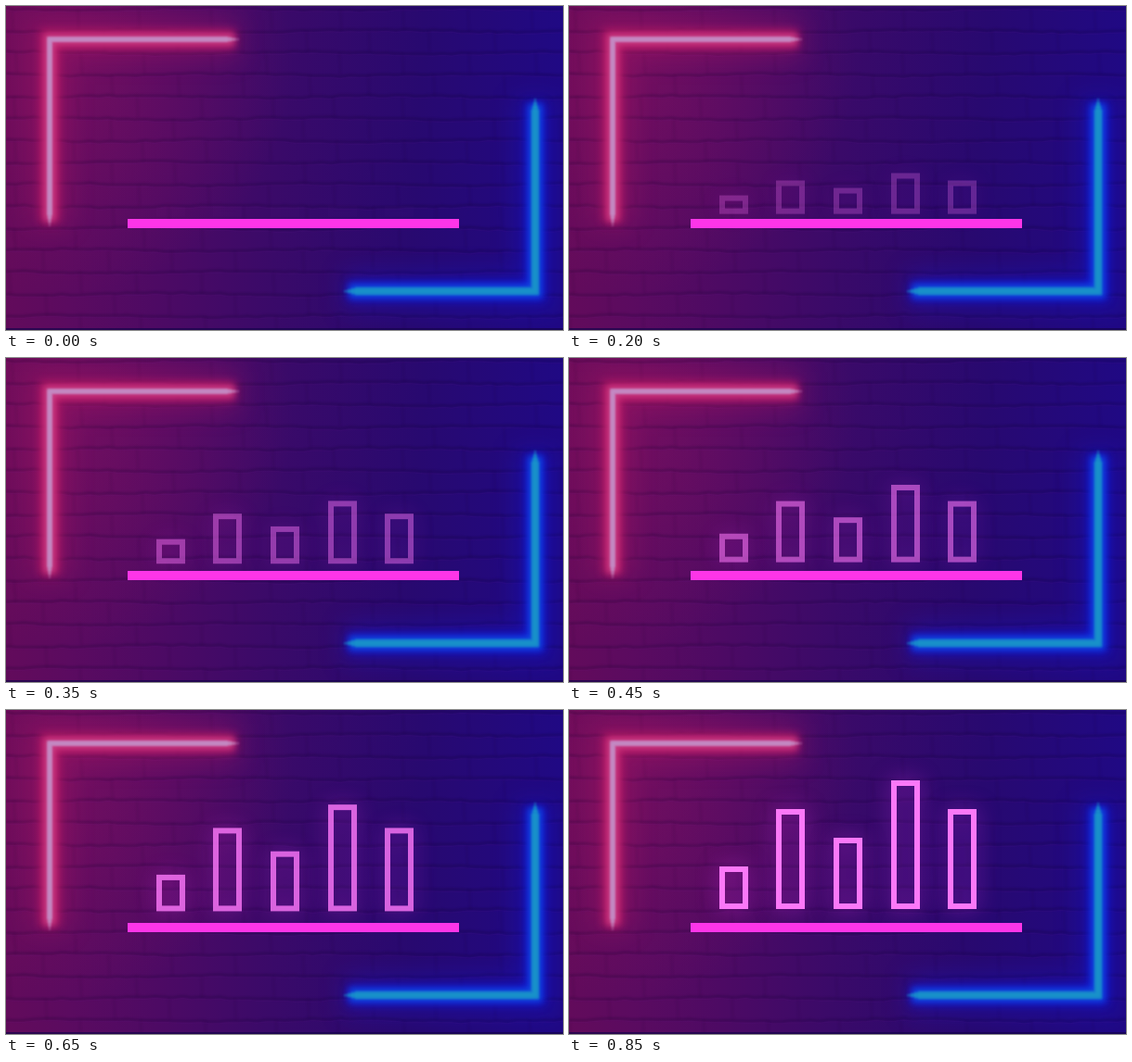
Animation of 600x350 px, one loop 900 ms. Source, as an HTML page with a canvas:

```html
<!DOCTYPE html>
<html lang="en">
<head>
<meta charset="utf-8">
<title>Neon bars</title>
<style>
  html, body { margin: 0; width: 100%; height: 100%; overflow: hidden; background: #300a69; }
  canvas { display: block; }
</style>
</head>
<body>
<canvas id="stage" width="600" height="350"></canvas>
<script>
const W = 600, H = 350, LOOP = 900, STEP = 50;
const ctx = document.getElementById('stage').getContext('2d');

let seed = 7;
const random = () => (seed = (seed * 16807) % 2147483647) / 2147483647;

function polyline(c, points, color, width, blur = 0) {
  c.filter = blur ? `blur(${blur}px)` : 'none';
  c.strokeStyle = color;
  c.lineWidth = width;
  c.beginPath();
  points.forEach(([x, y]) => c.lineTo(x, y));
  c.stroke();
  c.filter = 'none';
}

function drawBricks(c) {
  const rowHeight = 23.7, brick = 70;
  for (let row = 0; row < 15; row++) {
    const y = 2 + row * rowHeight;
    const mortar = [], edge = [];
    for (let x = 0; x <= W; x += 10) {
      const wave = Math.sin(x / 45 + row * 2) * 1.2 + random() * 1.6;
      mortar.push([x, y + wave]);
      edge.push([x, y + wave + 2.5]);
    }
    polyline(c, mortar, 'rgba(18,0,45,.27)', 2, 0.9);
    polyline(c, edge, 'rgba(160,60,190,.05)', 1.5, 0.7);
    for (let x = (row % 2) * brick / 2; x < W; x += brick) {
      const joint = x + random() * 12;
      polyline(c, [[joint, y + 2], [joint + 1, y + rowHeight]], 'rgba(18,0,45,.09)', 2, 1);
    }
  }
}

// Glow layers run the full length; the core narrows to a point at both ends.
function drawTube(c, [start, corner, end], glow, inner, core, width) {
  const path = trim => [
    [start[0], start[1] + Math.sign(corner[1] - start[1]) * trim],
    corner,
    [end[0] + Math.sign(corner[0] - end[0]) * trim, end[1]]
  ];
  polyline(c, path(0), `rgba(${glow},.28)`, 42, 13);
  polyline(c, path(4), `rgba(${glow},.85)`, 20, 5);
  polyline(c, path(6), `rgba(${inner},.75)`, width + 5, 3);
  for (let step = 0; step < 4; step++) {
    polyline(c, path(step * 4), `rgba(${core},.55)`, width * (step + 1) / 4, 1.2);
  }
}

function drawWall() {
  const wall = document.createElement('canvas');
  wall.width = W;
  wall.height = H;
  const c = wall.getContext('2d');
  const base = c.createLinearGradient(0, 0, W, 30);
  [[0, '#640b5a'], [.14, '#5b0b60'], [.3, '#4d0a64'], [.5, '#3a0a69'],
   [.75, '#280970'], [1, '#200984']].forEach(([at, color]) => base.addColorStop(at, color));
  c.fillStyle = base;
  c.fillRect(0, 0, W, H);
  const haze = c.createRadialGradient(60, 60, 0, 60, 60, 250);
  haze.addColorStop(0, 'rgba(150,20,95,.4)');
  haze.addColorStop(1, 'rgba(150,20,95,0)');
  c.fillStyle = haze;
  c.fillRect(0, 0, W, H);
  drawBricks(c);

  drawTube(c, [[47, 238], [47, 36], [251, 36]], '195,28,104', '208,75,145', '196,145,200', 6);
  drawTube(c, [[570, 100], [570, 308], [364, 308]], '14,28,228', '18,90,225', '27,150,200', 9);

  c.fillStyle = 'rgba(20,5,75,.7)';
  c.fillRect(0, 348, W, 2);
  return wall;
}

const wall = drawWall();
const bars = [[162, 46], [223, 108], [285, 77], [347, 139], [408, 108]];
const barWidth = 31, stroke = 6, minHeight = 11;

function draw(time) {
  const progress = Math.min(1, time / 810 + .012);
  ctx.drawImage(wall, 0, 0);

  ctx.save();
  ctx.globalAlpha = progress;
  ctx.strokeStyle = '#fb78f8';
  ctx.lineWidth = stroke;
  ctx.shadowColor = 'rgba(225,50,235,.5)';
  ctx.shadowBlur = 22;
  const bottom = 228 - 13 * progress;
  for (const [x, fullHeight] of bars) {
    const height = minHeight + (fullHeight - minHeight) * progress;
    ctx.strokeRect(x + stroke / 2, bottom - height + stroke / 2, barWidth - stroke, height - stroke);
  }
  ctx.restore();

  ctx.fillStyle = '#fd35e8';
  ctx.fillRect(131, 230, 357, 10);
}

function frame() {
  const time = performance.now() % LOOP;
  draw(Math.floor(time / STEP) * STEP);
  requestAnimationFrame(frame);
}
frame();
</script>
</body>
</html>
```
